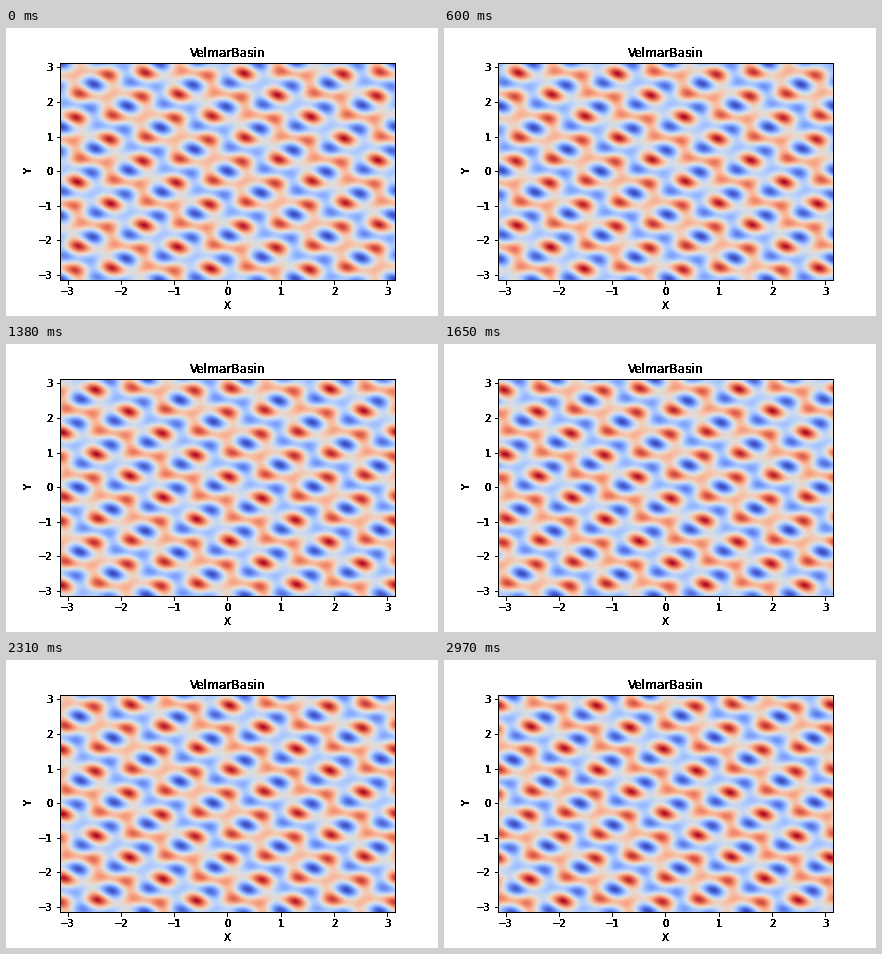
A matplotlib script that plays this animation: 432x288 px, repeating every 3 s.

```python
import numpy as np
import matplotlib.pyplot as plt
from matplotlib.animation import FuncAnimation

FRAMES = 100
BETA = 600 / (FRAMES - 1)
WAVES = [(10, 0), (0, 10), (7, 7)]

plt.rcParams.update({"font.family": "DejaVu Sans", "font.size": 10})

x = np.linspace(-np.pi, np.pi, 336)
y = np.linspace(-np.pi, np.pi, 218)
X, Y = np.meshgrid(x, y)


def field(t):
    """Sum of plane Rossby waves drifting west."""
    return -sum(np.cos(k * X + l * Y + BETA * k / (k * k + l * l) * t)
                for k, l in WAVES)


def solid(img, dpi):
    """Make every touched pixel fully opaque."""
    out = np.zeros_like(img)
    out[..., 3] = img[..., 3] > 0.12
    return out, 0, 0


fig, ax = plt.subplots(figsize=(6, 4), dpi=72)
fig.subplots_adjust(left=0.125, right=0.9, bottom=0.125, top=0.88)
sea = ax.imshow(field(0), cmap="coolwarm", origin="lower", aspect="auto",
                extent=(-np.pi, np.pi, -np.pi, np.pi))
ax.set_title("VelmarBasin")
ax.set_xlabel("X")
ax.set_ylabel("Y")
ax.set_xticks(range(-3, 4))
ax.set_yticks(range(-3, 4))
for part in (ax.title, ax.xaxis, ax.yaxis, *ax.spines.values()):
    part.set_agg_filter(solid)


def draw(n):
    sea.set_data(field(n))
    sea.autoscale()
    return [sea]


anim = FuncAnimation(fig, draw, frames=FRAMES, interval=30, repeat=True)
plt.show()
```
